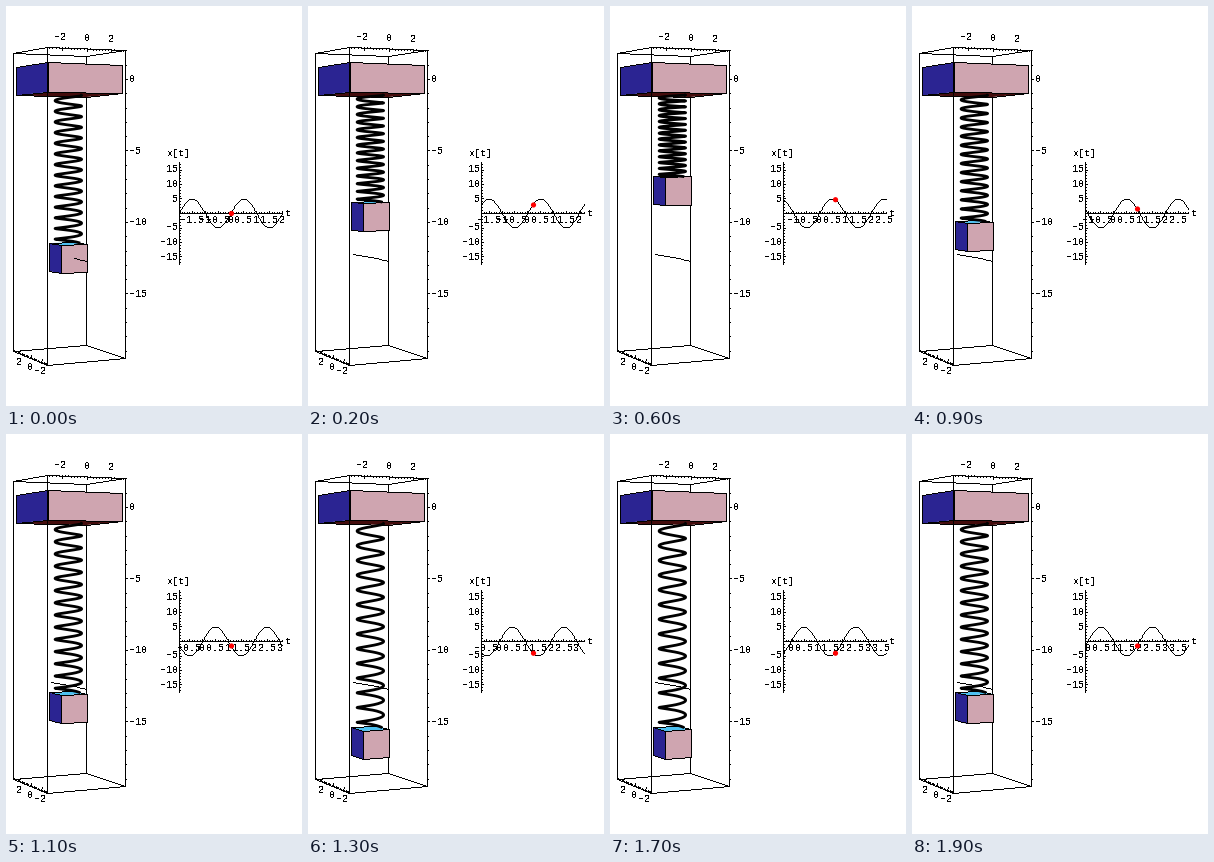
Write a matplotlib script that moves like this. It is 296x400 px and loops after 2000 ms.

```python
import math

import matplotlib.pyplot as plt
import numpy as np
from matplotlib.animation import FuncAnimation
from matplotlib.collections import PolyCollection
from matplotlib.patches import Circle, Polygon

W, H, DPI = 296, 400, 100
FRAMES, INTERVAL = 20, 100
PX = 72 / DPI

plt.rcParams.update({
    "font.family": "Liberation Mono",
    "font.size": 10 * PX,
    "text.antialiased": False,
    "text.hinting": "native",
    "text.hinting_factor": 1,
})

BLUE, PINK, BROWN, CYAN = "#2b2492", "#cfa5b0", "#440c0c", "#4cc0f0"

# Scene: bounding box, slab, hanging block and spring
SIDE, TOP, BOTTOM = 3.15, 2.03, -19.5
SLAB, BLOCK = 3.0, 1.06
REST, AMP, COILS = -12.6, 5.0, 14

# Plot: axis origin, extent and scale in pixels
PX0, PY0, SPAN = 173, 207, 103
XS, YS = SPAN / 4, 2.9

PIXEL = np.array([(-0.5, -0.5), (0.5, -0.5), (0.5, 0.5), (-0.5, 0.5)])

fig = plt.figure(figsize=(W / DPI, H / DPI), dpi=DPI, facecolor="white")
ax = fig.add_axes([0, 0, 1, 1])
ax.set_xlim(-0.5, W - 0.5)
ax.set_ylim(H - 0.5, -0.5)
ax.axis("off")


def project(x, y, z):
    """Perspective view of a scene point, in stage pixels."""
    u = (np.asarray(x) + SIDE) / (2 * SIDE)
    v = (np.asarray(y) + SIDE) / (2 * SIDE)
    depth = 1 + 0.0333 * u + 0.069 * v
    sx = (41.3 + 81.25 * u - 33.82 * v) / depth
    sy = 142 + 14.78 * (-4.83 - np.asarray(z)) / depth
    return sx, sy


def to_pixels(points):
    """Whole pixels along a polyline, without smoothing."""
    pts = np.rint(points)
    runs = []
    for a, b in zip(pts, pts[1:]):
        n = int(np.abs(b - a).max()) + 1
        runs.append(np.rint(np.linspace(a, b, n)))
    return np.concatenate(runs)


def draw(lines, z):
    """Draw polylines one hard pixel wide."""
    cells = np.unique(np.concatenate([to_pixels(p) for p in lines]), axis=0)
    return ax.add_collection(PolyCollection(
        cells[:, None] + PIXEL, facecolors="black", edgecolors="none",
        linewidths=0, zorder=z), autolim=False)


def flat(points):
    return np.column_stack(project(*zip(*points)))


def face(points, color, z):
    pts = flat(points)
    fill = ax.add_patch(Polygon(pts, fc=color, ec="none", zorder=z))
    return [fill, draw([np.vstack([pts, pts[:1]])], z)]


def label(x, y, s, ha="center"):
    return ax.text(x, y + 2.5, s.replace("-", "\u2212"), ha=ha,
                   va="baseline", zorder=9)


def cuboid(r, low, high, z):
    """Two front faces of a square prism."""
    left = face([(-r, r, high), (-r, -r, high), (-r, -r, low), (-r, r, low)],
                BLUE, z)
    right = face([(-r, -r, high), (r, -r, high), (r, -r, low), (-r, -r, low)],
                 PINK, z)
    return left + right


def square(r, z):
    return [(-r, -r, z), (r, -r, z), (r, r, z), (-r, r, z)]


def draw_box():
    s = SIDE
    front, back = [], []
    for z in (TOP, BOTTOM):
        left, right, far = (-s, s, z), (s, -s, z), (s, s, z)
        front.append(flat([left, (-s, -s, z), right]))
        back.append(flat([left, far, right]))
    for x, y in ((-s, -s), (s, -s), (-s, s)):
        front.append(flat([(x, y, BOTTOM), (x, y, TOP)]))
    back.append(flat([(s, s, BOTTOM), (s, s, TOP)]))
    draw(back, 1)

    def mark(point, dx, dy):
        px, py = (float(c) for c in project(*point))
        front.append([(px, py), (px + dx, py + dy)])
        return px, py

    for i in range(-12, 13):
        mark((i / 4, -s, TOP), 0, 1)
        mark((-s, i / 4, BOTTOM), 0, -1)
    for k in (-2, 0, 2):
        px, py = mark((k, -s, TOP), 0, 3)
        label(px - (2 if k < 0 else 0), py - 10, str(k))
        px, py = mark((-s, k, BOTTOM), 1, -3)
        label(px - (1 if k < 0 else 0), py + 9, str(k))
    for k in range(-19, 3):
        big = k % 5 == 0
        _, py = mark((s, -s, k), 2 if big else 1, 0)
        if big:
            label(122.5, py + 0.5, str(k), "left")
    draw(front, 7)


def draw_axes():
    lines = [[(PX0, PY0), (PX0 + SPAN, PY0)],
             [(PX0, PY0 - SPAN / 2), (PX0, PY0 + SPAN / 2)]]
    for k in range(-17, 18):
        y = PY0 - k * YS
        lines.append([(PX0, y), (PX0 + (2 if k % 5 == 0 else 1), y)])
        if k and k % 5 == 0:
            label(172, y, str(k), "right")
    draw(lines, 8)
    label(172, 147, "x[t]")
    label(282, 206.5, "t")


draw_box()
face(square(SLAB, -1), BROWN, 3)
cuboid(SLAB, -1, 1, 3)
draw([flat([(0, -BLOCK, REST), (0, 3, REST)])], 2)
draw([flat([(0, -3, REST), (0, -BLOCK, REST)])], 6)
draw_axes()

theta = np.linspace(0, 2 * math.pi * COILS, COILS * 40 + 1)
moving = []


def draw_spring(top):
    z = -1 + (top + 1) * theta / theta[-1]
    xs, ys = project(np.cos(theta), -np.sin(theta), z)
    return ax.plot(xs, ys, color="black", lw=2.8 * PX,
                   solid_capstyle="butt", zorder=5)[0]


def draw_wave(t):
    start = t - 2
    s = np.linspace(start, start + 4, SPAN + 1)
    lines = [np.column_stack([PX0 + (s - start) * XS,
                              PY0 - AMP * np.sin(math.pi * s) * YS])]
    parts = []
    first = round(start * 10)
    for k in range(first, first + 41):
        x = PX0 + (k - first) / 10 * XS
        major = k % 5 == 0
        lines.append([(x, PY0), (x, PY0 - (2 if major else 1))])
        if major and k != first:
            parts.append(label(x, 214, f"{k / 10:g}"))
    return parts + [draw(lines, 8)]


def update(n):
    while moving:
        moving.pop().remove()
    t = n / 10
    shift = AMP * math.sin(math.pi * t)
    mid = REST + shift
    moving.extend(face(square(BLOCK, mid + 1), CYAN, 4))
    moving.extend(cuboid(BLOCK, mid - 1, mid + 1, 4))
    moving.append(draw_spring(mid + 1))
    moving.extend(draw_wave(t))
    dot = Circle((PX0 + SPAN / 2 + 0.5, PY0 - shift * YS), 2.6, fc="red",
                 ec="none", zorder=10)
    moving.append(ax.add_patch(dot))
    return moving


anim = FuncAnimation(fig, update, frames=FRAMES, interval=INTERVAL,
                     init_func=lambda: update(0), repeat=True,
                     repeat_delay=0, blit=False)
plt.show()
```
